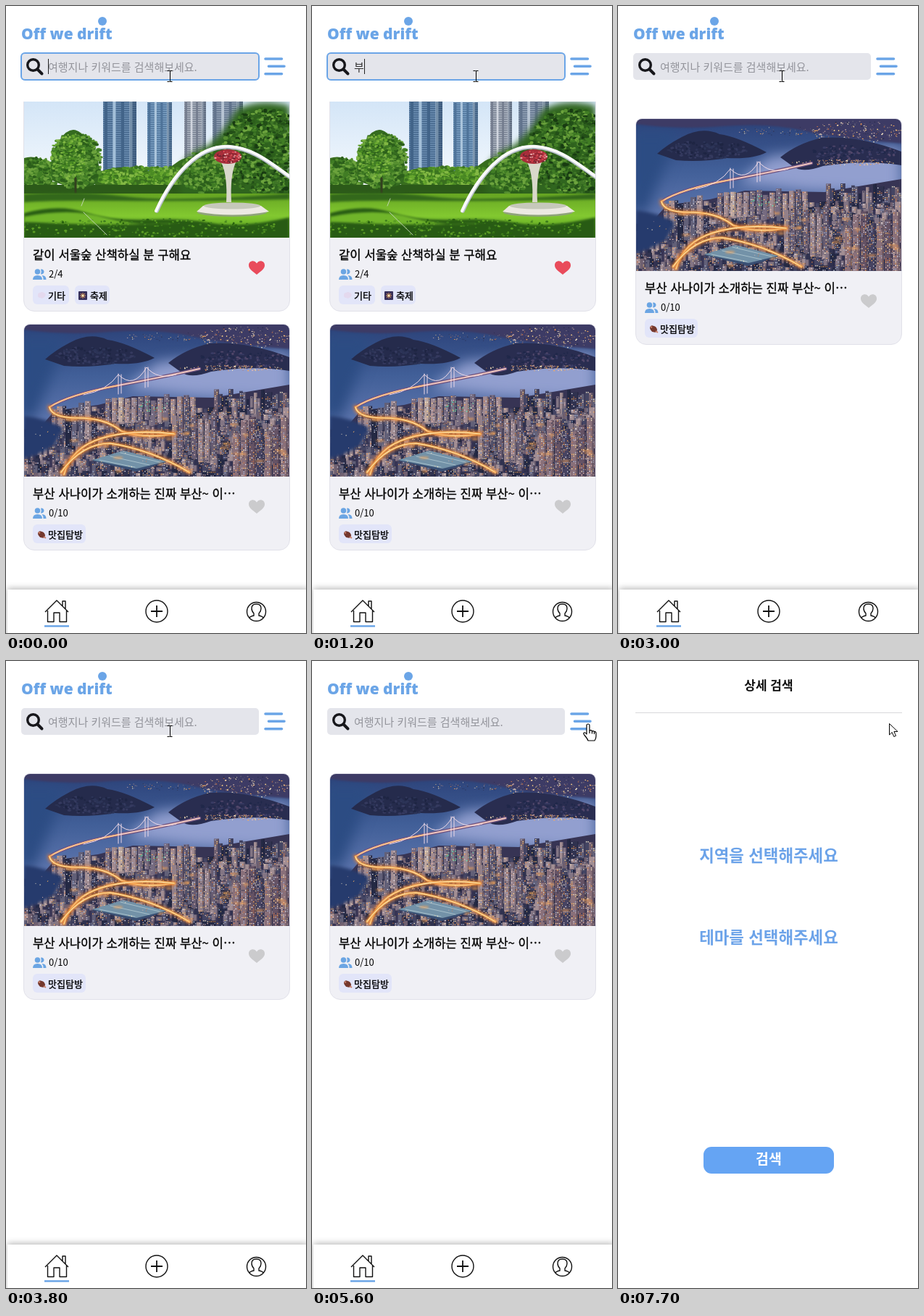
These frames come from a looping animation (414 by 866 pixels, 8000 ms). An HTML page with a canvas:

```html
<!DOCTYPE html>
<html lang="ko">
<head>
<meta charset="utf-8">
<title>Travel search</title>
<style>
html, body { margin: 0; width: 100%; height: 100%; overflow: hidden; background: #fff; }
body { position: relative; font-family: "Noto Sans CJK KR", "Noto Sans KR", "Noto Sans CJK", sans-serif; }
svg, .layer { position: absolute; left: 0; top: 0; }
.stage { position: absolute; left: 0; top: 0; width: 414px; height: 866px; overflow: hidden; background: #fff; }
.layer { width: 414px; height: 866px; }
svg { overflow: visible; }

.anim { animation: 8s step-end infinite; }
.list { position: absolute; left: 0; top: 132px; width: 414px; height: 674px; overflow: hidden; }
.card { position: absolute; left: 24px; width: 368px; height: 313px; box-sizing: border-box; overflow: hidden;
  border: 1px solid #e1e1e9; border-radius: 9px 9px 15px 15px; background: #f0f0f5; }
.card canvas { position: absolute; left: 0; top: 0; }
.card svg { left: -1px; top: -1px; }
.park { top: -23px; animation-name: leave; }
.coast { top: 307px; animation-name: rise; }
.title { font-size: 16.7px; }
.small { font-size: 13px; }
.medium { stroke: #000; stroke-width: .35px; }

.field { position: absolute; left: 21px; top: 65px; width: 328px; height: 37px; border-radius: 5px; background: #e4e5eb; }
.focus { position: absolute; inset: -1px; border: 2px solid #6ba5e7; border-radius: 6px; box-sizing: border-box; animation-name: leave; }
.entry { position: absolute; left: 37px; top: 0; width: 280px; height: 37px; overflow: hidden; }
.lines { font-size: 15px; line-height: 37px; color: #333; white-space: nowrap; animation-name: type; }
.lines div { height: 37px; }
.lines .hint { color: #93949b; }
.caret { position: absolute; left: 37px; top: 8px; width: 1px; height: 21px; background: #222; animation-name: caret; }

.nav { position: absolute; left: 2px; top: 806px; width: 414px; height: 70px; background: #fff; box-shadow: 0 -2px 8px rgba(0,0,0,.27); }
.detail { background: #fff; visibility: hidden; animation-name: arrive; }
.detail text { text-anchor: middle; font-weight: 700; }

.cursor { position: absolute; left: 0; top: 0; animation: move 8s step-end infinite; }
.beam { animation-name: beam; }
.hand { animation-name: hand; }
.arrow { animation-name: arrive; }

@keyframes leave { 0% { visibility: visible; } 32.5%, 100% { visibility: hidden; } }
@keyframes rise { 0% { transform: none; } 32.5%, 100% { transform: translateY(-284px); } }
@keyframes arrive { 0% { visibility: hidden; } 92.5%, 100% { visibility: visible; } }
@keyframes beam { 0% { visibility: visible; } 60%, 100% { visibility: hidden; } }
@keyframes hand { 0% { visibility: hidden; } 60% { visibility: visible; } 92.5%, 100% { visibility: hidden; } }
@keyframes type {
  0% { transform: none; }
  13.75% { transform: translateY(-37px); }
  15% { transform: translateY(-74px); }
  16.25% { transform: translateY(-111px); }
  17.5% { transform: translateY(-148px); }
  18.75% { transform: translateY(-185px); }
  32.5%, 100% { transform: none; }
}
@keyframes caret {
  0% { opacity: 1; transform: none; }
  5% { opacity: 0; transform: none; }
  11.25% { opacity: 1; transform: none; }
  13.75% { opacity: 1; transform: translateX(14px); }
  17.5% { opacity: 1; transform: translateX(28px); }
  25% { opacity: 0; transform: translateX(28px); }
  31.25% { opacity: 1; transform: translateX(28px); }
  32.5%, 100% { opacity: 0; transform: none; }
}
@keyframes move {
  0% { transform: translate(226px, 97px); }
  53.75% { transform: translate(226px, 97px); animation-timing-function: steps(5); }
  60% { transform: translate(366px, 80px); animation-timing-function: steps(4); }
  65% { transform: translate(381px, 87px); }
  92.5% { transform: translate(381px, 87px); animation-timing-function: steps(3); }
  96.25%, 100% { transform: translate(374px, 86px); }
}
</style>
</head>
<body>
<div class="stage">
  <svg width="414" height="120">
    <circle cx="133" cy="21" r="6" fill="#6ba5e7"/>
    <text x="21" y="46" font-family="'Open Sans', sans-serif" font-weight="800" font-size="21" fill="#6ba5e7">Off we drift</text>
    <path d="M358 73h22.500M362.500 83.200h21.500M358 93.800h22.500" stroke="#6ba5e7" stroke-width="3.600" stroke-linecap="round"/>
  </svg>

  <div class="field">
    <div class="focus anim"></div>
    <svg width="40" height="37" fill="none" stroke="#17171b">
      <circle cx="16.500" cy="16.500" r="7.800" stroke-width="3.400"/>
      <path d="M22.500 22.500l6 6" stroke-width="4" stroke-linecap="round"/>
    </svg>
    <div class="entry"><div class="lines anim">
      <div class="hint">여행지나 키워드를 검색해보세요.</div>
      <div>ㅂ</div><div>부</div><div>붓</div><div>부사</div><div>부산</div>
    </div></div>
    <div class="caret anim"></div>
  </div>

  <div class="list">
    <div class="card park anim">
      <canvas id="park" width="366" height="210"></canvas>
      <svg width="368" height="313" viewBox="24 0 368 313">
        <text class="title medium" x="37" y="241">같이 서울숲 산책하실 분 구해요</text>
        <use href="#people" x="37" y="254"/>
        <text class="small" x="59" y="266">2/4</text>
        <use href="#heart" x="346" y="252.600" fill="#e94b5b"/>
        <g fill="#e2e5f9"><rect x="37" y="277" width="50" height="26" rx="6"/><rect x="95" y="277" width="48" height="26" rx="6"/></g>
        <path d="M44 291a3 3 0 0 1 3-4q3-2 5 0q4 1 2 5q-3 4-7 2q-3 0-3-3z" fill="#e4d9ee"/>
        <rect x="100" y="285" width="12" height="12" rx="1" fill="#37305a"/>
        <path d="M106 287v8M102 291h8M103 288l6 6M109 288l-6 6" stroke="#e79b5b"/>
        <circle cx="106" cy="291" r="1.500" fill="#fff0b8"/>
        <text class="small medium" x="58" y="296">기타</text>
        <text class="small medium" x="116" y="296">축제</text>
      </svg>
    </div>
    <div class="card coast anim">
      <canvas id="coast" width="366" height="210"></canvas>
      <svg width="368" height="313" viewBox="24 0 368 313">
        <text class="title medium" x="37" y="241">부산 사나이가 소개하는 진짜 부산~ 이…</text>
        <use href="#people" x="37" y="254"/>
        <text class="small" x="59" y="266">0/10</text>
        <use href="#heart" x="346" y="252.600" fill="#cbcbcd"/>
        <rect x="37" y="277" width="73" height="26" rx="6" fill="#e2e5f9"/>
        <ellipse cx="49" cy="291" rx="5.500" ry="4" transform="rotate(38 49 291)" fill="#74382e"/>
        <path d="M45 288l2 1M52 294l3 2" stroke="#c9806a" stroke-width="2"/>
        <text class="small medium" x="58" y="296">맛집탐방</text>
      </svg>
    </div>
  </div>

  <div class="nav"></div>
  <svg width="414" height="866" fill="none" stroke="#111" stroke-width="1.400">
    <path d="M54 837l16-16 16 16M57.500 835v15.500h8.500v-12.500h8v12.500h9.500v-15.500M78 828.500v-6.500h4v10.500" stroke-linejoin="round"/>
    <path d="M53 856.500h34" stroke="#6ba5e7" stroke-width="2.500"/>
    <circle cx="208" cy="836" r="15"/>
    <path d="M200 836h16M208 828v16" stroke-width="1.800"/>
    <circle cx="345.500" cy="836.500" r="13"/>
    <path d="M336 845q1-2 6-3v-3q-3-3-3-7q0-6 6.500-6t6.500 6q0 4-3 7v3q5 1 6 3"/>
  </svg>

  <div class="layer detail anim">
    <svg width="414" height="866">
      <text x="208" y="40" font-size="17" fill="#111">상세 검색</text>
      <path d="M24 71.500h368" stroke="#d8d8da"/>
      <g font-size="22.400" fill="#6ca3e9">
        <text x="208" y="276.500">지역을 선택해주세요</text>
        <text x="208" y="389.500">테마를 선택해주세요</text>
      </g>
      <rect x="118" y="671" width="180" height="37" rx="11" fill="#65a4f3"/>
      <text x="208" y="695" font-size="19.500" fill="#fff">검색</text>
    </svg>
  </div>

  <div class="cursor">
    <svg class="beam anim" width="1" height="1"><path d="M-3.500-7.500h3l.5.5.5-.5h3M.5-7V7M-3.500 7.500h3l.5-.5.5.5h3" fill="none" stroke="#000"/></svg>
    <svg class="hand anim" width="1" height="1" fill="#fff" stroke="#000" stroke-width="1.200" stroke-linejoin="round">
      <path d="M-2 2a2 2 0 0 1 4 0v7q2-1 3.500.7q2-.6 3 .8q2.500-.3 2.500 2.500v4q0 3-2 6h-9q-1-3-5-7.500q-2-2.500-.5-3.500t3.500 2z"/>
      <path d="M2 9v4M5.500 10v3.500M8.500 11v3"/>
    </svg>
    <svg class="arrow anim" width="1" height="1"><path d="M.5.5V16l3.700-3.500 2.600 6 2.700-1.200-2.600-5.800H12z" fill="#fff" stroke="#000"/></svg>
  </div>

  <svg width="0" height="0"><defs>
    <g id="people" fill="#6ba5e3">
      <circle cx="6.500" cy="4" r="3.800"/><path d="M0 15q0-6 6.500-6t6.500 6z"/>
      <path d="M11 .8a3.400 3.400 0 1 1 0 6.400q1.500-3 0-6.400zM12.500 9q6 0 6 6h-4q0-4-2-6z"/>
    </g>
    <path id="heart" d="M0 9.500C-7 4-11 1-11-3.500C-11-10-3-11.500 0-6C3-11.500 11-10 11-3.500C11 1 7 4 0 9.500z"/>
  </defs></svg>
</div>

<script>
function painter(id, seed) {
  const c = document.getElementById(id).getContext('2d');
  const rand = (a = 0, b = 1) => {
    seed = (seed * 16807) % 2147483647;
    return a + (b - a) * seed / 2147483647;
  };
  const pick = list => list[Math.floor(rand(0, list.length))];
  const box = (x, y, w, h, fill) => { c.fillStyle = fill; c.fillRect(x, y, w, h); };
  const shape = (d, fill) => { c.fillStyle = fill; c.fill(new Path2D(d)); };
  const line = (d, color, width) => {
    c.strokeStyle = color; c.lineWidth = width; c.lineCap = 'round';
    c.stroke(new Path2D(d));
  };
  const oval = (x, y, rx, ry, fill) => {
    c.fillStyle = fill; c.beginPath(); c.ellipse(x, y, rx, ry, 0, 0, 7); c.fill();
  };
  const fade = (y0, y1, ...colors) => {
    const g = c.createLinearGradient(0, y0, 0, y1);
    colors.forEach((color, i) => g.addColorStop(i / (colors.length - 1), color));
    return g;
  };
  // Scatter small dots over an elliptical patch
  const scatter = (n, x, y, rx, ry, size, colors) => {
    for (let i = 0; i < n; i++) {
      const a = rand(0, 6.283), r = Math.sqrt(rand());
      oval(x + rx * r * Math.cos(a), y + ry * r * Math.sin(a), size * rand(.5, 1.2), size * rand(.4, .9), pick(colors));
    }
  };
  // Building with a lit side and a grid of window specks
  const tower = (x, y, w, h, wall, lights, chance) => {
    box(x, y, w, h, wall);
    for (let v = y + 1; v < y + h - 1; v += 2.5)
      for (let u = x + 1; u < x + w - 1; u += 2.5)
        if (rand() < chance) box(u, v, 1.5, 1.2, pick(lights));
    box(x + w * .75, y, w * .25, h, 'rgba(20,22,45,.3)');
  };
  const soft = (radius, draw) => { c.filter = `blur(${radius}px)`; draw(); c.filter = 'none'; };
  return { rand, pick, box, shape, line, oval, fade, scatter, tower, soft };
}

function paintPark() {
  const { box, shape, line, oval, fade, scatter, soft } = painter('park', 71);
  const deep = ['#183b12', '#234f18', '#2f611d', '#3f7527'];
  const leaf = ['#2c5f1b', '#417d25', '#568f30', '#6ca33d'];
  const bright = ['#4b8b24', '#66a62e', '#3b7420', '#82b843'];
  box(0, 0, 366, 150, fade(20, 130, '#d3e5f7', '#f3f8fd'));

  const facade = (x, top, w, body, shade, glint) => {
    box(x, top, w, 130 - top, body);
    for (let y = top; y < 130; y += 3) box(x, y, w, 1, shade);
    for (let k = 0; k < 4; k++) box(x + w * (.04 + k * .25), top, w * .09, 130 - top, k % 2 ? glint : shade);
    box(x + w * .8, top, w * .2, 130 - top, 'rgba(30,52,82,.35)');
  };
  facade(109, 10, 46, '#6486aa', '#426489', '#a3bfd8');
  facade(170, 23, 34, '#7196ba', '#4e7399', '#abc5dc');
  facade(221, 10, 30, '#a1a9b6', '#747d8e', '#d0d5de');
  facade(260, 10, 42, '#8999ae', '#61738c', '#b8c5d4');

  shape('M0 100Q18 94 39 111V155H0zM98 121Q135 107 160 117T208 108T250 114V152H98z', '#396e1f');
  scatter(320, 18, 125, 30, 25, 3, leaf);
  scatter(650, 172, 126, 76, 14, 3, bright);
  box(0, 137, 366, 14, '#2c5a19');
  soft(4, () => shape('M216 145Q204 100 254 83Q280 60 292 35Q320 16 366 28V152H216z', '#30651f'));
  scatter(1100, 333, 92, 61, 60, 3.2, deep.concat(leaf));
  scatter(360, 250, 119, 33, 30, 3, leaf);
  shape('M39 131Q32 97 49 75Q69 45 89 79Q109 100 101 135Q72 148 39 131z', '#356b20');
  scatter(650, 72, 104, 35, 38, 3, leaf);
  scatter(200, 61, 98, 25, 31, 2, bright);
  line('M71 128V156', '#33401f', 3);

  box(0, 149, 366, 61, fade(149, 210, '#66a522', '#82c830', '#4f981b'));
  soft(1.5, () => {
    shape('M0 150Q75 145 140 153T366 149V157Q220 160 130 159T0 161z', '#33681b');
    shape('M0 176Q48 163 84 175T170 185T260 190T366 182V212H0z', '#285b14');
    shape('M0 181Q65 168 112 182T216 189Q140 194 40 190T0 187z', '#70b52a');
  });
  scatter(260, 165, 197, 200, 13, 1.8, ['#3d7b1c', '#28610f', '#5a9c23']);
  line('M83 156l-4 10M82 175L114 206', '#c8d7bf', .9);

  oval(287, 175, 48, 6, '#8fa37a');
  shape('M238 174L247 166Q287 159 327 166L338 174Q287 183 238 174z', '#ece9e2');
  oval(287, 166, 39, 4.5, '#c6c8bb');
  shape('M272 106Q281 125 279 161H286Q284 125 292 106z', '#d9d8cb');
  oval(281, 98, 19, 10, '#a72f3b');
  scatter(75, 281, 99, 18, 9, 1.5, ['#dc4650', '#6b2431', '#edaaaa', '#8c2632']);
  line('M183 173C205 125 240 82 284 85C318 87 344 111 369 128', '#b7bfca', 5.5);
  line('M182 173C204 124 240 81 284 84C318 86 344 110 369 127', '#fafafa', 4);
}

function paintCoast() {
  const { rand, pick, box, shape, line, oval, fade, scatter, tower, soft } = painter('coast', 293);
  const warm = ['#ffd58a', '#ffad57', '#fff0cc', '#ce7648', '#eabdb4'];
  const cool = ['#e8e8f4', '#a8b8dc', '#cfbcc8', '#252b4c'];
  const walls = ['#30324f', '#444563', '#626078', '#837584', '#a28e93', '#242944', '#6f6070'];
  box(0, 0, 366, 210, fade(0, 140, '#2b4178', '#415f98', '#6178b0'));
  soft(9, () => {
    shape('M185 52L366 38V105L235 99L140 88z', '#929fcf');
    shape('M-10 15H60L15 130H-10z', '#2c4c83');
  });
  soft(1, () => shape('M-4-4H370V34Q275 27 230 16T120 10T0 7z', '#3d3b65'));
  scatter(230, 305, 18, 64, 15, 1, warm.concat(walls));
  scatter(70, 205, 17, 65, 6, .8, warm.concat(walls));
  shape('M29 48Q42 36 63 25Q91 10 115 21Q139 24 180 46Q161 56 125 54Q90 60 55 57z', '#252b4c');
  scatter(130, 97, 43, 57, 12, 2.3, ['#1e2543', '#2c3457', '#353a5f']);
  shape('M199 53Q222 34 256 26Q306 22 366 45V64Q315 56 258 65Q230 75 217 66z', '#292d50');
  scatter(140, 300, 48, 61, 12, 2, ['#20284a', '#383b63', '#51476a']);
  scatter(120, 286, 60, 72, 4, .9, warm);

  // Land and distant waterfront
  shape('M0 168L42 119L102 111L150 99L260 101L366 83V210H0z', '#373454');
  for (let x = 262; x < 366; x += 5) {
    const h = rand(7, 22);
    tower(x, 111 - h, rand(3, 7), h + 15, pick(walls), warm.concat(cool), .4);
  }
  line('M35 114Q61 97 130 84T242 61', '#6c5280', 4.5);
  line('M35 114Q61 97 130 84T242 61', '#efc6bd', 2);
  line('M35 114Q61 97 130 84', '#ffc17d', 1.5);
  line('M82 97Q115 91 130 69Q151 90 169 59Q184 77 210 69M130 68V96M134 69V95M167 59V87M171 59V86', '#eed9e7', 1);

  for (let y = 120; y < 218; y += 8)
    for (let x = y > 150 ? 0 : 38; x < 366; x += rand(4, 9)) {
      const h = rand(5, 15);
      tower(x, y - h / 2, rand(4, 10), h, pick(walls), warm.concat(cool), .38);
    }
  soft(2, () => shape('M0 126Q30 129 54 143L42 167Q18 182-5 187z', '#263b6d'));
  for (let x = 112; x < 232; x += 9)
    tower(x, 96 + rand(0, 9), 7.5, 34, pick(['#a18b91', '#766b80', '#bda7a0']), cool.concat(warm), .45);
  for (let x = 57; x < 96; x += 9)
    tower(x, 104 + rand(0, 18), 8, 53, pick(walls), cool, .45);
  for (let x = 204; x < 266; x += 9)
    tower(x, 108 + rand(0, 30), 8, 60, pick(['#685d72', '#938089', '#515069']), cool.concat(warm), .5);
  for (let x = 288; x < 366; x += 11)
    tower(x, 118 + rand(0, 32), 10, 90, pick(['#655365', '#89707a', '#464361']), cool.concat(warm), .45);

  const road = d => {
    soft(2, () => line(d, 'rgba(235,128,49,.7)', 6));
    line(d, '#eaa04b', 3);
    line(d, '#ffe4ac', 1.2);
  };
  road('M35 114Q38 129 75 129T134 147Q164 158 207 151');
  road('M207 151Q149 144 107 157T55 207');
  road('M51 204Q80 164 119 164Q176 173 228 204');
  shape('M94 188L137 175L196 190L155 203z', '#394f73');
  shape('M94 187L137 174L196 189L155 199z', '#7392a8');
  line('M104 187L153 197M119 182L173 194M133 177L187 190', '#a7c0cb', 1);
  for (let i = 0; i < 25; i++)
    soft(1.5, () => oval(rand(60, 360), rand(130, 205), rand(3, 7), 1.5, 'rgba(255,170,88,.75)'));
  scatter(260, 185, 160, 180, 46, .8, warm);
  scatter(22, 179, 113, 22, 8, 1, ['#59c69a', '#6cdbae']);
}

paintPark();
paintCoast();
</script>
</body>
</html>
```
